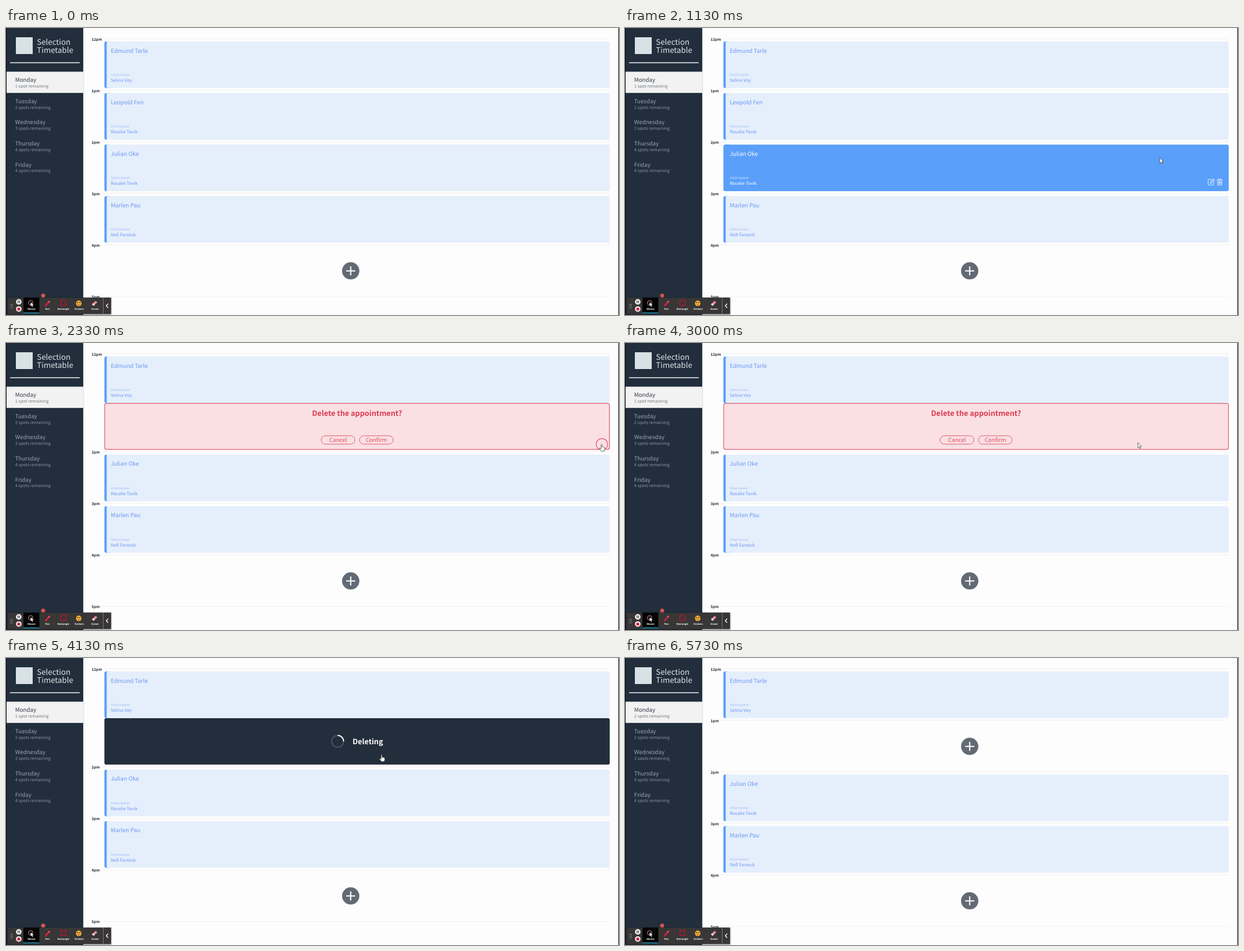
Recreate the animation shown at these times as an HTML page. Size 1056 by 496 pixels, loop 6660 ms.

```html
<!DOCTYPE html>
<html lang="en">
<head>
<meta charset="utf-8">
<title>Appointment board</title>
<style>
  html, body { margin: 0; width: 100%; height: 100%; overflow: hidden; background: #fdfdfd; }
  svg { display: block; width: 1056px; height: 496px; }
  text { font-family: "Noto Sans CJK JP", "Noto Sans CJK SC", "Noto Sans", sans-serif; text-rendering: geometricPrecision; white-space: pre; }
  .mid { text-anchor: middle; }
  .title { font-size: 13.25px; font-weight: 300; fill: #dfe4e8; }
  .day { font-size: 9.7px; fill: #98a4b0; }
  .spots { font-size: 7.4px; font-weight: 300; fill: #8793a0; }
  .active .day { fill: #333b45; }
  .active .spots { fill: #737a82; }
  .hour { font-size: 6.4px; font-weight: 700; fill: #262b31; }
  .rule { stroke: #f0f0f0; }
  .card .edge { fill: #5a9ff8; }
  .card .face { fill: #e5effc; }
  .card .who { font-size: 9.85px; fill: #6e97f0; }
  .card .label { font-size: 6.2px; font-weight: 300; fill: #a3bbf5; }
  .card .host { font-size: 7.6px; fill: #6c94f2; }
  .card .icons { display: none; fill: none; stroke: #d9e9ff; stroke-width: 1.1; }
  .card.on .face { fill: #5a9ffa; }
  .card.on .who, .card.on .host { fill: #fff; }
  .card.on .label { fill: #d5e6ff; }
  .card.on .icons { display: inline; }
  .ask { font-size: 12.7px; font-weight: 700; fill: #db3c51; }
  .btn rect { fill: none; stroke: #dd5a6b; }
  .btn text { font-size: 9.75px; fill: #db4a5d; }
  .btn.on rect { fill: #dc3549; stroke: #dc3549; }
  .btn.on text { fill: #fff; }
  .busy { font-size: 12.7px; font-weight: 700; fill: #fff; }
  .tool { font: 700 4.1px "Open Sans", sans-serif; fill: #fff; }
</style>
</head>
<body>
<svg id="stage" viewBox="0 0 1056 496"></svg>
<script>
const LOOP = 6660, STEP = 200 / 3;
const ASK = 2200, BUSY = 3730, FREE = 4470, LEAVE = 5730;
const CLICKS = [[2130, 1026.5, 175], [3600, 647.5, 167]];
// time, x, y of the pointer tip; a trailing 1 eases into that point
const PATH = [
  [260, 640, 500], [660, 797, 316], [800, 852, 272], [1200, 935, 215],
  [1530, 978, 175], [1870, 1026, 175, 1], [2700, 1026, 175], [3420, 647, 167, 1]
];

const text = (cls, x, y, s) => `<text class="${cls}" x="${x}" y="${y}">${s}</text>`;
const group = (id, body, cls = '') => `<g id="${id}" class="${cls}">${body}</g>`;

const hour = (label, y) =>
  text('hour', 147.5, y + 2.5, label) +
  `<path class="rule" d="M${label.length > 3 ? 168 : 164} ${y - .5}H1040"/>`;

const card = (id, y, who, host) => group(id, `
  <rect class="edge" x="169.5" y="${y}" width="12" height="80.5" rx="3"/>
  <path class="face" d="M173.5 ${y}h863.5q3 0 3 3v74.5q0 3-3 3h-863.5z"/>
  ${text('who', 180.5, y + 19.2, who)}
  ${text('label', 180.5, y + 59.8, 'Interviewer')}
  ${text('host', 180.5, y + 69.8, host)}
  <g class="icons" transform="translate(0 ${y})">
    <path d="M1011 60h-5q-1.500 0-1.500 1.500v7q0 1.500 1.500 1.500h6.500q1.500 0 1.500-1.500v-3M1008 67l.5-2.500 5-5 2 2-5 5z"/>
    <path d="M1019.500 61h10M1022.500 61v-1.500h4v1.500M1020.700 61l.5 9h6.600l.5-9M1023 63v5M1024.500 63v5M1026 63v5"/>
  </g>`, 'card');

const plus = y => `<circle cx="593.800" cy="${y}" r="14.900" fill="#626b75"/>
  <path d="M586 ${y}h15.600M593.800 ${y - 7.8}v15.600" stroke="#fff" stroke-width="2"/>`;

const button = (id, x, label) => group(id,
  `<rect x="${x}" y="160.300" width="58" height="14.500" rx="7.250"/>` +
  text('mid', x + 29, 171.2, label), 'btn');

const days = ['Monday', 'Tuesday', 'Wednesday', 'Thursday', 'Friday'].map((day, i) => {
  const y = 36.6 * i, n = Math.min(i + 1, 4);
  return group('day' + i, text('day', 15.8, 93.2 + y, day) +
    text('spots', 15.8, 103 + y, `${n} spot${n > 1 ? 's' : ''} remaining`), i ? '' : 'active');
}).join('');

const sidebar = `
  <rect x="133" width="1.500" height="496" fill="#e4e6e8"/>
  <rect width="133" height="496" fill="#222e3c"/>
  <rect x="17" y="16" width="29" height="29" fill="#d8e1e5"/>
  ${text('title', 53.3, 29.3, 'Selection')}${text('title', 53.3, 42.6, 'Timetable')}
  <path d="M7 60H127" stroke="#eef0f2" stroke-width="1.500"/>
  <rect x="1" y="75.500" width="132" height="36.700" fill="#f2f2f2"/>
  ${days}
  <circle cx="64" cy="462.500" r="3.500" fill="#d8544f"/>`;

const tools = ['Mouse', 'Pen', 'Rectangle', 'Stickers', 'Eraser']
  .map((s, i) => text('tool mid', 44 + 27.4 * i, 487.2, s)).join('');

const toolbar = `
  <rect x="2" y="465" width="180.500" height="31" rx="2" fill="#000" opacity=".22"/>
  <rect x="3" y="466" width="178" height="28.500" rx="1.500" fill="#383637"/>
  <rect x="30" y="466" width="27.500" height="28" fill="#050505"/>
  <path d="M30 492.500h27.500" stroke="#35a9cf" stroke-width="1.500"/>
  <path d="M8.500 477v8M11 477v8" stroke="#bbb" stroke-width="1.200" stroke-dasharray="1.200 2"/>
  <circle cx="22" cy="473.300" r="4.800" fill="#f2f2f2"/>
  <path d="M20.700 471v4.600M23.300 471v4.600" stroke="#333" stroke-width="1.200"/>
  <circle cx="22" cy="485.700" r="4.800" fill="#f2f2f2"/>
  <rect x="19.500" y="483.200" width="5" height="5" rx="1.500" fill="#d9203d"/>
  <circle cx="42.500" cy="475" r="3.900" fill="none" stroke="#d98a90"/>
  <path d="M42.500 474l5 4.500-2.200.3 1.200 2.400-1.300.6-1.200-2.500-1.500 1.400z" fill="#fff"/>
  <path d="M68.500 479.500l4.500-5" stroke="#d5203b" stroke-width="3"/>
  <path d="M73 474.500l2.500-2.800" stroke="#e95068" stroke-width="2.500"/>
  <path d="M67 481.500l.5-3 2 2z" fill="#d5203b"/>
  <rect x="94.500" y="471" width="8.500" height="8.500" fill="none" stroke="#c8102e" stroke-width="1.300"/>
  <circle cx="125.300" cy="475.800" r="4.800" fill="#f4b53b"/>
  <path d="M122 474.500h2.500M126 474.500h2.500" stroke="#54371a" stroke-width="1.700"/>
  <path d="M123 477.500q2.300 2.500 4.600 0z" fill="#b5312c"/>
  <path d="M148 477.500l6.500-6 2.800 2.800-6.500 6z" fill="#e78e9c"/>
  <path d="M148 477.500l2.200-2 2.800 2.800-2.200 2z" fill="#f2d5da"/>
  ${tools}
  <path d="M167.500 466v28.500" stroke="#777"/>
  <path d="M176 476.500l-3.300 3.500 3.300 3.500" fill="none" stroke="#fff" stroke-width="1.300"/>`;

const confirmBox = `
  <rect x="170" y="104.300" width="869.500" height="79.500" rx="3" fill="#fae0e3" stroke="#d95c6d" stroke-width="1.200"/>
  ${text('ask mid', 604.8, 126.4, 'Delete the appointment?')}
  ${button('cancel', 543, 'Cancel')}${button('confirm', 609, 'Confirm')}`;

const busyBox = `
  <rect x="169.500" y="104" width="870.500" height="80.300" rx="3" fill="#222e3c"/>
  <g fill="none" stroke-width="1.900">
    <circle cx="571.300" cy="144" r="10.200" stroke="#48535f"/>
    <path id="spin" d="M571.300 133.800a10.200 10.200 0 0 1 10.200 10.200" stroke="#fff"/>
  </g>
  ${text('busy', 597, 149, 'Deleting')}`;

const stage = document.getElementById('stage');
stage.innerHTML = `
  <rect width="1056" height="496" fill="#fdfdfd"/>
  ${hour('12pm', 19)}
  ${card('first', 23.3, 'Edmund Tarle', 'Selina Voy')}
  ${group('row', hour('1pm', 108))}
  ${card('second', 112.4, 'Leopold Fen', 'Rosalie Tovik')}
  ${group('open', plus(152.7))}
  ${group('lower', hour('2pm', 197) + card('third', 201.5, 'Julian Oke', 'Rosalie Tovik') +
    hour('3pm', 286) + card('fourth', 290.6, 'Marlen Pau', 'Nell Farwick') +
    hour('4pm', 375.3) + plus(419.7) + hour('5pm', 464.4))}
  ${group('ask', confirmBox)}
  ${group('busy', busyBox)}
  ${sidebar}${toolbar}
  <path d="M.5 0v496M1055.500 0v496" stroke="#050505"/>
  <circle id="ring" fill="none" stroke="#dc5262" stroke-width="1.200"/>
  <g id="pointer" stroke="#333" stroke-width=".7" stroke-linejoin="round" fill="#fff">
    <path id="arrow" d="M0 0v9.200l2.100-1.900 1.500 3.300 1.500-.7-1.500-3.200h2.700z"/>
    <path id="hand" d="M-.9 .7q.9-1.500 1.800 0v4l1.300-.3.4.5 1.200-.1.4.6q1.300-.2 1.300 1v2.600l-1 3h-4.800l-3.200-4.300q-.2-1.500 1.100-1l1.500 1.200z"/>
  </g>`;

const el = id => document.getElementById(id);
const show = (id, on) => el(id).style.display = on ? '' : 'none';
const light = (id, on) => el(id).classList.toggle('on', on);

function tipAt(t) {
  let i = 0;
  while (i < PATH.length - 1 && t >= PATH[i + 1][0]) i++;
  const a = PATH[i], b = PATH[i + 1];
  if (!b) return [a[1], a[2]];
  let k = Math.max(0, (t - a[0]) / (b[0] - a[0]));
  if (b[3]) k = k * k * (3 - 2 * k);
  return [a[1] + (b[1] - a[1]) * k, a[2] + (b[2] - a[2]) * k];
}

function draw(t) {
  const booked = t < ASK, asking = t >= ASK && t < BUSY;
  const busy = t >= BUSY && t < FREE, free = t >= FREE;
  const [x, y] = tipAt(t), hoverY = tipAt(t - 100)[1];

  show('second', booked);
  show('row', booked || free);
  show('open', free);
  show('ask', asking);
  show('busy', busy);
  el('lower').setAttribute('transform', `translate(0 ${asking || busy ? -8.5 : 0})`);
  el('day0').lastChild.textContent = free ? '2 spots remaining' : '1 spot remaining';

  const canHover = booked && t >= 860;
  light('second', canHover && hoverY < 193);
  light('third', canHover && hoverY > 201.5 && hoverY < 282);
  const onCancel = asking && x > 543 && x < 601;
  const onConfirm = asking && x > 609 && x < 667;
  light('cancel', onCancel);
  light('confirm', onConfirm);
  el('spin').setAttribute('transform', `rotate(${(t - 4130) * .36} 571.3 144)`);

  const onBin = x > 1018 && t < 2760;
  const hand = onBin || onCancel || onConfirm || busy;
  show('pointer', t >= PATH[0][0] && t < LEAVE);
  show('hand', hand);
  show('arrow', !hand);
  el('pointer').setAttribute('transform', `translate(${x} ${y})`);

  const click = CLICKS.find(c => t >= c[0] && t < c[0] + 400);
  show('ring', click);
  if (click) {
    const [start, cx, cy] = click, ring = el('ring');
    ring.setAttribute('cx', cx);
    ring.setAttribute('cy', cy);
    ring.setAttribute('r', 17 - .035 * (t - start));
  }
}

const begin = performance.now();
function tick() {
  const t = Math.max(0, performance.now() - begin) % LOOP;
  draw(Math.floor((t + 7) / STEP) * STEP);
  requestAnimationFrame(tick);
}
tick();
</script>
</body>
</html>
```
